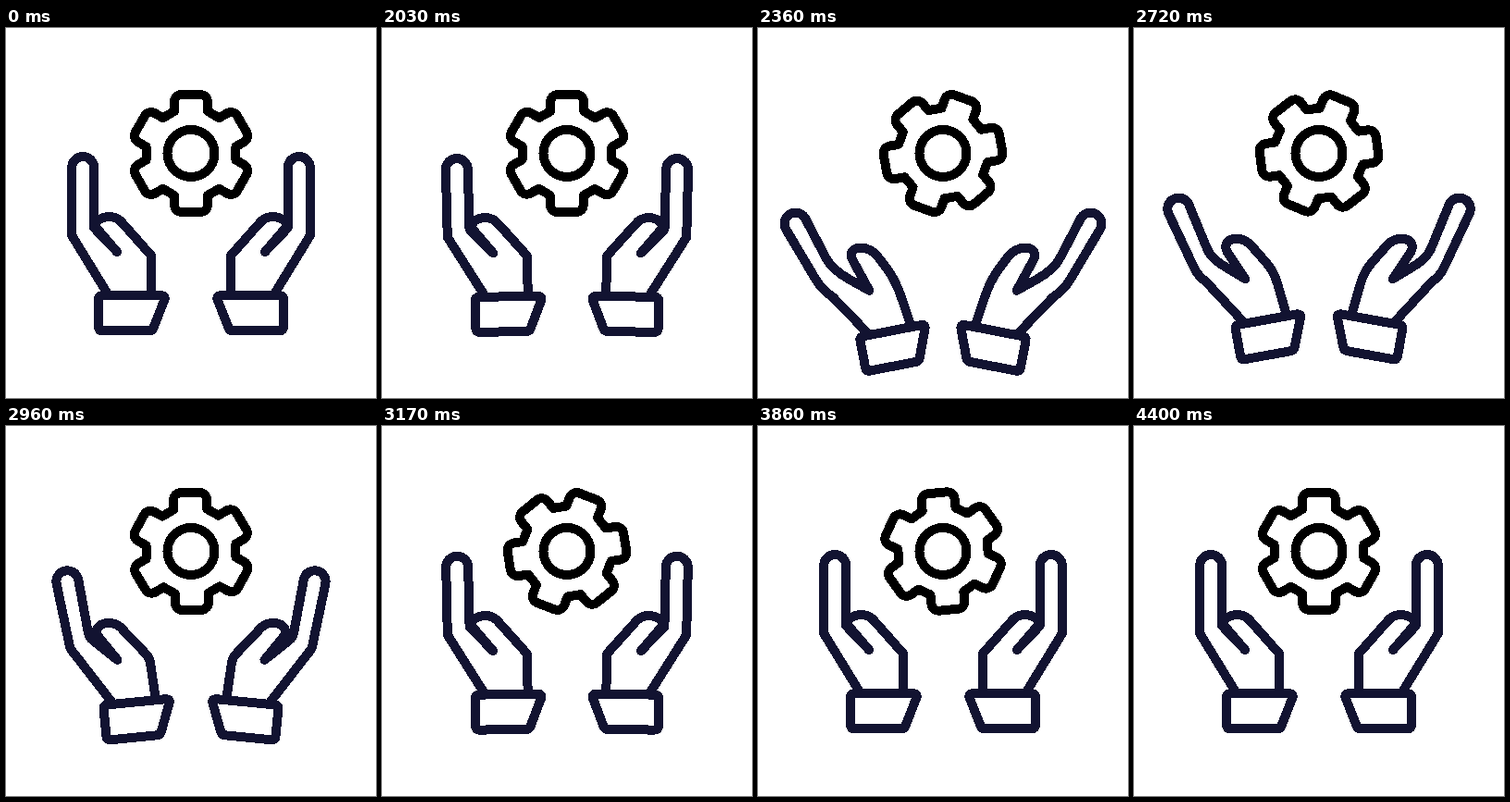
These frames come from a looping animation (400 by 400 pixels, 4.46 s). An HTML page:

```html
<!DOCTYPE html>
<html lang="en">
<head>
<meta charset="utf-8">
<title>Gear and hands</title>
<style>
  html, body { margin: 0; width: 100%; height: 100%; overflow: hidden; background: #fff; }
  svg { display: block; width: 100vw; height: 100vh; }
  .line {
    fill: none; stroke-width: 10; stroke-linecap: round; stroke-linejoin: round;
    shape-rendering: crispEdges;
  }
</style>
</head>
<body>
<svg viewBox="0 0 400 400">
  <defs>
    <path id="tooth" d="M-18-45.5V-55.5a8 8 0 0 1 8-8h20a8 8 0 0 1 8 8v10L30.4-38.3"/>
    <g id="hand">
      <path id="palm"/>
      <path d="M104 289.3H167.5q5.500 0 3.700 4.800L159.500 323.800q-1.400 3.500-5 3.500H104q-4 0-4-4V293.300q0-4 4-4z"/>
    </g>
  </defs>
  <g class="line" stroke="#000" transform="translate(200 135.5)">
    <circle r="25.5"/>
    <g id="gear">
      <use href="#tooth"/>
      <use href="#tooth" transform="rotate(60)"/>
      <use href="#tooth" transform="rotate(120)"/>
      <use href="#tooth" transform="rotate(180)"/>
      <use href="#tooth" transform="rotate(240)"/>
      <use href="#tooth" transform="rotate(300)"/>
    </g>
  </g>
  <g class="line" stroke="#121331">
    <use href="#hand"/>
    <use href="#hand" transform="translate(400) scale(-1 1)"/>
  </g>
</svg>
<script>
  const LOOP = 4460, START = 2030, STEP = 30, LAST = 4400;
  const [gear, hand, palm] = ['gear', 'hand', 'palm'].map(id => document.getElementById(id));

  const clamp = x => Math.min(1, Math.max(0, x));
  const smooth = x => x * x * (3 - 2 * x);
  const ramp = (t, a, b) => clamp((t - a) / (b - a));
  const mix = (a, b, k) => a.map((v, i) => v + (b[i] - v) * k);

  // cubic-bezier(x1, 0, x2, 1)
  function ease(x, x1, x2) {
    let lo = 0, hi = 1;
    for (let i = 0; i < 24; i++) {
      const s = (lo + hi) / 2, r = 1 - s;
      if (3 * r * r * s * x1 + 3 * r * s * s * x2 + s * s * s < x) lo = s;
      else hi = s;
    }
    return smooth(lo);
  }

  // Line to corner c, its tip cut by the shares r and s and rounded
  const corner = (a, c, b, r, s) => `L${mix(c, a, r)}Q${c} ${mix(c, b, s)}`;

  // open: 0 is a raised hand, 1 a lowered and spread one
  function drawHand(open) {
    const wrist = [111, 272], crease = [120, 242], end = [157, 289];
    const heel = mix([71, 224], [69.8, 231.5], open);
    const web = mix([95.2, 216], [84.5, 212], open);
    const thumb = mix([96, 214], [109.4, 207.5], open);
    const lift = mix([99, 203], [102.3, 189.5], open);
    const fall = mix([117, 200], [129, 189.5], open);
    const side = mix([126, 211], [137.4, 210], open);
    const knuckle = mix([157, 246], [150, 236.7], open);

    // The finger bends outwards and ends in a half circle
    const [x, y] = mix([83.2, 151], [54.8, 156], open);
    const bend = .37 * open, dx = 12 * Math.cos(bend), dy = 12 * Math.sin(bend);
    const left = [x - dx, y + dy], right = [x + dx, y - dy];

    palm.setAttribute('d', 'M111 289.3' +
      corner(wrist, heel, left, .25 * open, .18 * open) +
      `L${left}A12 12 0 0 1 ${right}` +
      corner(right, web, crease, .25 * open, .45 * open) +
      `L${crease}L${thumb}C${lift} ${fall} ${side}` +
      corner(side, knuckle, end, .5 * open, .4 * open) + `L${end}`);

    const lean = 1 - (1 - open) ** 2;
    hand.setAttribute('transform', `translate(0 ${54 * open}) rotate(${-11 * lean} 64 235)`);
  }

  function draw(now) {
    let t = now % LOOP;
    t = t < START ? 0 : Math.min(LAST, START + Math.floor((t - START) / STEP) * STEP);
    drawHand(smooth(ramp(t, 1980, 2400)) - smooth(ramp(t, 2440, 3260)));
    gear.setAttribute('transform', `rotate(${180 * ease(ramp(t, 1975, LAST), .333, .2)})`);
  }

  let origin;
  function tick(now) {
    origin ??= now;
    draw(now - origin);
    requestAnimationFrame(tick);
  }
  draw(0);
  requestAnimationFrame(tick);
</script>
</body>
</html>
```
